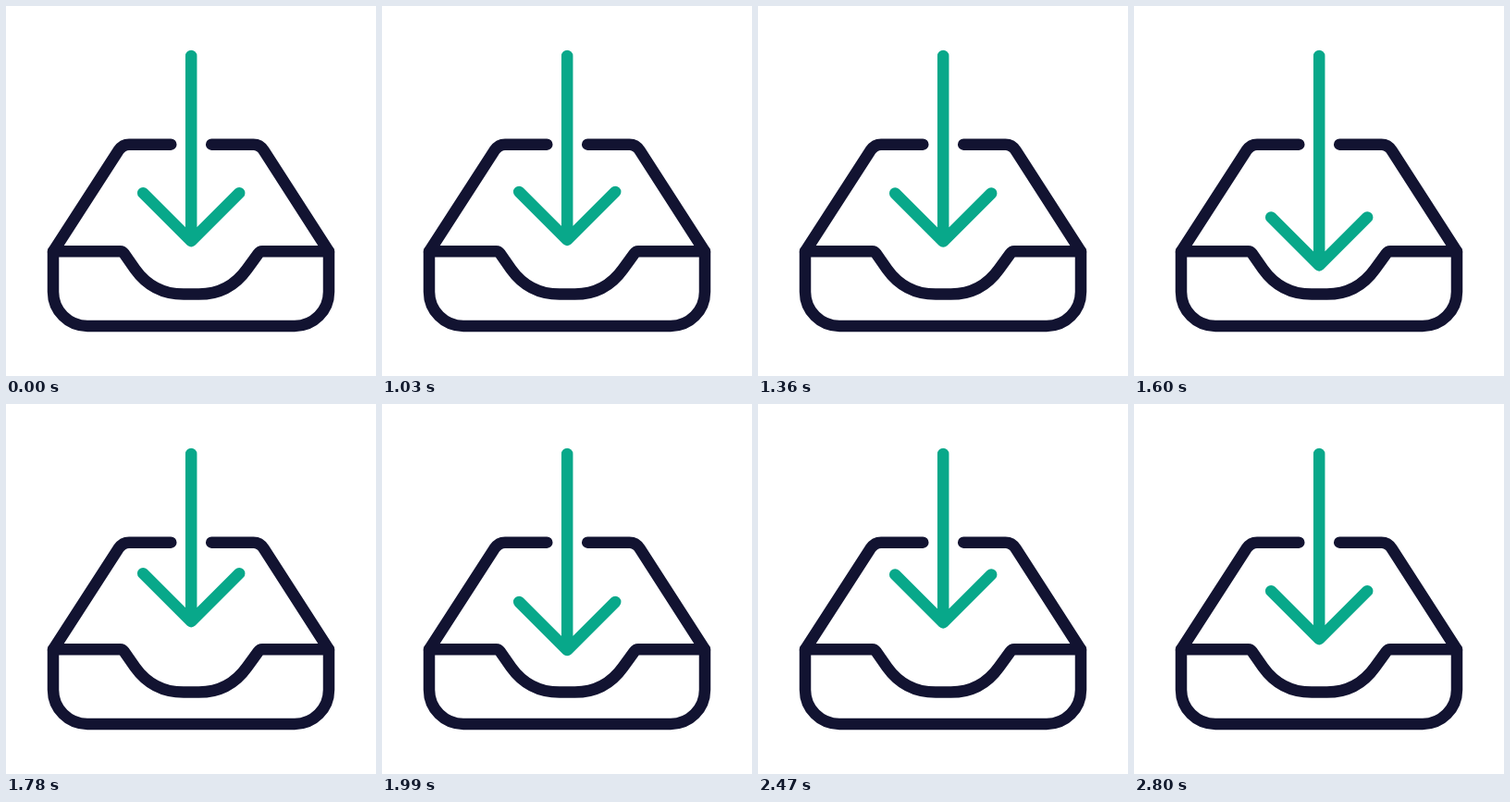
An HTML page with a canvas that plays this animation: 400x400 px, repeating every 2830 ms.

```html
<!DOCTYPE html>
<html lang="en">
<head>
<meta charset="utf-8">
<title>Inbox arrow</title>
<style>
html, body { margin: 0; width: 100%; height: 100%; overflow: hidden; background: #fff; }
canvas { display: block; width: 400px; height: 400px; }
</style>
</head>
<body>
<canvas id="stage"></canvas>
<script>
const SIZE = 400, LOOP = 2830, REST = 1000, STEP = 30;
const NAVY = '#121331', GREEN = '#08a88a';

const canvas = document.getElementById('stage');
const ctx = canvas.getContext('2d');
const ratio = window.devicePixelRatio || 1;
canvas.width = canvas.height = Math.round(SIZE * ratio);
ctx.scale(ratio, ratio);
ctx.lineWidth = 12.5;
ctx.lineCap = ctx.lineJoin = 'round';

const lid = new Path2D(
  'M51 265.5 L121.5 156.3 Q126 149.7 133 149.7 H178.3' +
  'M349 265.5 L278.8 156.3 Q274.5 149.7 267.5 149.7 H222.2');
const tray = new Path2D(
  'M51 265.3 H123.5 Q126 265.3 128 268 L139.5 284.5' +
  'C152 302 170 311.6 192 311.6 H208.5' +
  'C230 311.6 248 302 260.5 284.5 L272.5 268 Q274.5 265.3 277 265.3' +
  'H349 V309 C349 329.5 332.5 346 312 346 H88 C67.5 346 51 329.5 51 309 Z');

// Arrow head travel: [step, offset in px], eased between points
const keys = [[0, 0], [6.2, -19], [19.3, 27.6], [26, -19], [37.5, 27.6], [47, -19], [60, 0]];

const smooth = t => t * t * (3 - 2 * t);

function offsetAt(step) {
  for (let i = 1; i < keys.length; i++) {
    const [a, from] = keys[i - 1], [b, to] = keys[i];
    if (step <= b) return from + (to - from) * smooth((step - a) / (b - a));
  }
  return 0;
}

function draw(ms) {
  const step = Math.max(0, Math.floor((ms - REST) / STEP));
  const tip = 254.2 + offsetAt(step);

  ctx.fillStyle = '#fff';
  ctx.fillRect(0, 0, SIZE, SIZE);

  ctx.strokeStyle = NAVY;
  ctx.stroke(lid);
  ctx.stroke(tray);

  ctx.strokeStyle = GREEN;
  ctx.beginPath();
  ctx.moveTo(200.2, 54);
  ctx.lineTo(200.2, tip);
  ctx.moveTo(148.2, tip - 52);
  ctx.lineTo(200.2, tip);
  ctx.lineTo(252.2, tip - 52);
  ctx.stroke();
}

const start = performance.now();
function tick() {
  draw((performance.now() - start) % LOOP);
  requestAnimationFrame(tick);
}
tick();
</script>
</body>
</html>
```
